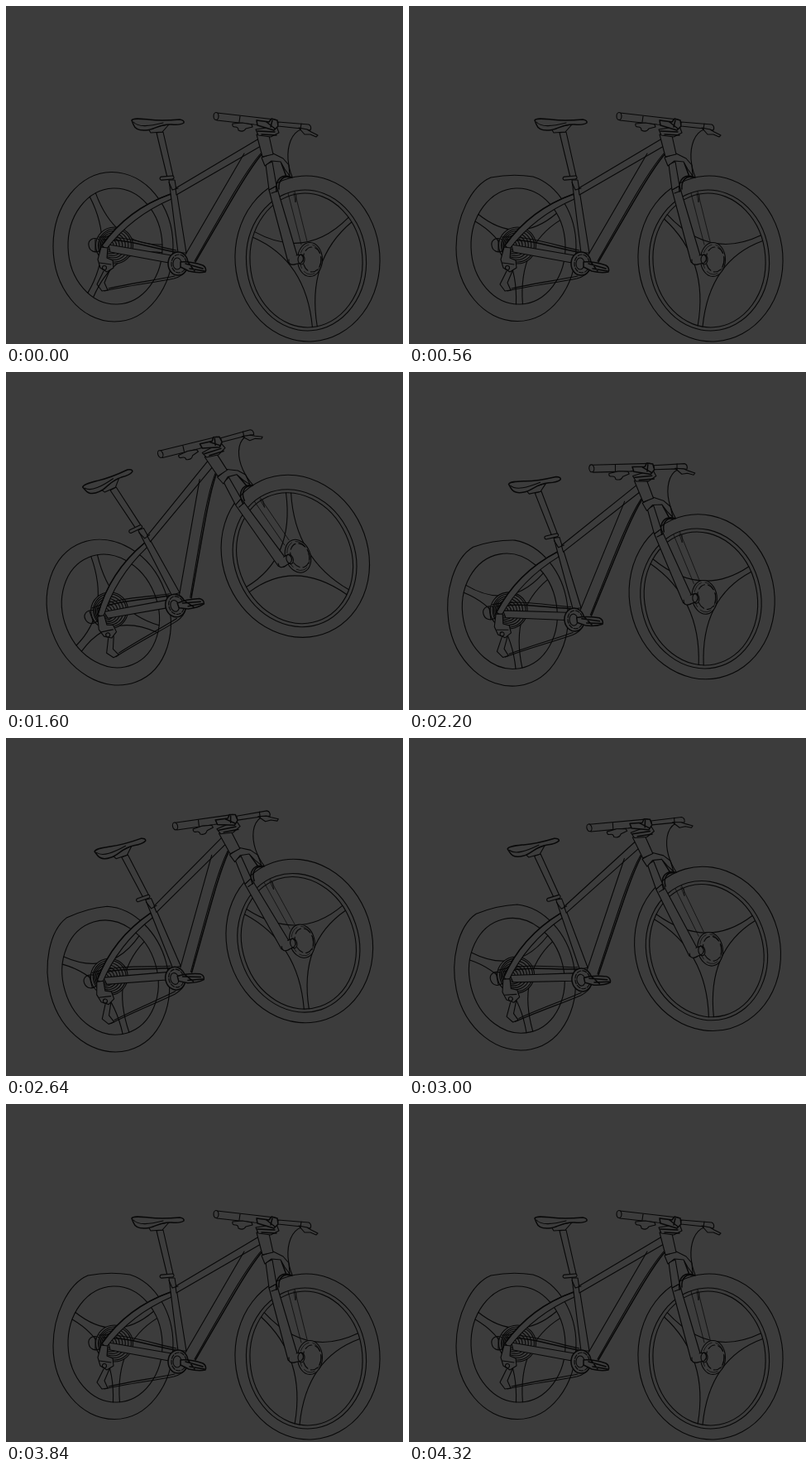
An HTML page for the animation above (4360 ms loop, 480 by 408 pixels).

```html
<!DOCTYPE html>
<html lang="en">
<head>
<meta charset="utf-8">
<title>Bicycle</title>
<style>
  html, body { margin: 0; width: 100%; height: 100%; overflow: hidden; background: #3c3c3c; }
  svg { display: block; width: 480px; height: 408px; }
  svg * { vector-effect: non-scaling-stroke; }
  #bike { fill: none; stroke: #080808; stroke-width: 1.1; stroke-linecap: round; stroke-linejoin: round; }
  .solid { fill: #3c3c3c; }
  .bold { stroke-width: 1.5; }
  .thin { stroke-width: .7; }
</style>
</head>
<body>
<svg viewBox="0 0 480 408">
  <g id="bike">
    <!-- rear wheel -->
    <path id="tyre"/>
    <g transform="translate(132 290) rotate(-2) scale(57 70)">
      <circle r="1"/>
      <path id="rearSpokes"/>
    </g>

    <!-- front wheel and lower fork, sliding on the suspension -->
    <g id="front">
      <g transform="translate(364.5 305) rotate(-4)"><ellipse rx="87.5" ry="100"/></g>
      <g transform="translate(363 307) rotate(-4)"><ellipse rx="72.5" ry="85"/></g>
      <g transform="translate(363 307) rotate(-4) scale(68 81)">
        <circle r="1"/>
        <path id="frontSpokes"/>
      </g>
      <path class="thin" d="M341 226L357 288M349 224L364 284M348 226L350 237L351 228"/>
      <ellipse class="solid" cx="367.500" cy="306" rx="15" ry="20.500"/>
      <ellipse cx="370" cy="306" rx="11" ry="15" stroke-dasharray="9 4"/>
      <ellipse cx="368" cy="306" rx="13" ry="18" class="thin" stroke-dasharray="14 5"/>
      <path class="solid" d="M318 222L341 309Q347 315 353 310L352 301L327 217Z"/>
      <path d="M321 226L329 223"/>
      <path class="solid" d="M342 306Q341 313 348 312L357 310Q362 305 357 300L351 301"/>
      <ellipse cx="357" cy="306" rx="4" ry="6"/>
      <path class="bold" d="M327 224C325 209 334 201 346 207M330 221C329 211 335 204 343 207M333 190L339 206"/>
    </g>

    <!-- cassette -->
    <ellipse class="solid" cx="131" cy="289" rx="22.500" ry="22"/>
    <g id="cassette"></g>
    <path d="M113 282C105 278 99 283 100 289C101 296 108 299 114 295M108 281V296"/>

    <!-- chain and stays -->
    <path class="bold" d="M118 282C145 281 180 293 210 298"/>
    <path d="M112 279C145 277 180 290 206 295"/>
    <path class="solid" d="M124 288L200 301L197 310L126 297Z"/>
    <path d="M119 344C145 338 178 334 203 329Q214 326 218 319M124 341C150 335 180 331 204 326"/>
    <path class="solid" d="M199 227C168 238 138 258 116 289L121 294C143 265 170 246 200 233Z"/>
    <path class="bold" d="M199 227C168 238 138 258 116 289"/>

    <!-- derailleur -->
    <path class="solid" d="M115 291L111 306L114 316L122 321L130 316L129 307L122 304L123 292Z"/>
    <circle cx="119" cy="316" r="2.500"/>
    <path d="M118 320L110 336L116 344L123 343L119 334L125 320M113 310L127 312"/>

    <!-- frame -->
    <path class="solid" d="M197 210L208 298L218 298L204 210Z"/>
    <path class="solid" d="M205 220L306 160L310 168L206 228Z"/>
    <path d="M288 178L217 300M308 178C290 199 272 231 228 308"/>
    <path class="bold" d="M309 179C291 201 273 234 229 309"/>
    <path d="M197 213L201 222L208 220"/>

    <!-- seat -->
    <path class="solid" d="M182 153L195 207L202 205L190 152Z"/>
    <rect class="solid" x="186" y="205.500" width="17" height="4" rx="2" transform="rotate(-5 195 207)"/>
    <path class="solid" d="M171 147L175 153L189 152L197 143Z"/>
    <path class="solid bold" d="M152 138C154 135 162 136 172 137C187 139 199 138 210 137Q216 138 215 141Q211 144 200 143C185 142 179 150 169 150Q157 151 154 143Z"/>
    <path d="M154 140C160 147 174 145 190 141"/>

    <!-- crank and pedal -->
    <ellipse class="solid bold" cx="208" cy="311" rx="12" ry="14"/>
    <ellipse cx="209" cy="311" rx="9" ry="11" stroke-dasharray="5 2"/>
    <ellipse cx="207" cy="311" rx="5" ry="7"/>
    <path class="solid bold" d="M211 309Q222 308 238 313Q243 316 241 321Q233 323 221 320L211 315Z"/>
    <path class="bold" d="M217 311L238 317M222 317L240 320M220 309L228 320"/>

    <!-- upper fork and head tube -->
    <path id="stanchion" class="solid"/>
    <path class="solid" d="M309 183L313 193L321 187L332 188L337 197L343 205L342 192L335 184L323 178Z"/>
    <path class="solid" d="M303 155L310 182L323 179L317 152Z"/>

    <!-- cockpit -->
    <path id="hose"/>
    <g transform="translate(0 1)">
      <path class="solid" d="M302 148L305 155L320 157L330 152L327 144Z"/>
      <path class="bold" d="M304 150L325 151M309 154L327 155"/>
      <path class="solid" d="M255 128L325 136L326 144L300 142L255 137Z"/>
      <ellipse class="solid" cx="254" cy="132" rx="3" ry="4.500"/>
      <path d="M283 132L282 139"/>
      <path class="solid" d="M274 141Q273 145 277 145Q281 145 281 149Q287 152 290 147L298 145L297 142L286 140Z"/>
      <path class="solid bold" d="M303 137L318 139L321 135L328 137L329 144L324 149L304 143Z"/>
      <path class="bold" d="M315 139L325 147M322 137L320 145"/>
      <path class="solid" d="M329 139L366 142Q370 144 368 149L357 147L329 144Z"/>
      <path class="solid" d="M354 146L361 154L368 154L375 157L377 155L369 151L364 148Z"/>
      <path d="M357 141L356 148"/>
    </g>
  </g>
</svg>
<script>
const FRAME = 40, COUNT = 109;
const $ = id => document.getElementById(id);

// time, crank x, crank y, pitch in degrees, fork compression
const poses = [
  [0, 208, 311, 0, 0], [560, 208, 311, 0, 0], [820, 203, 304.5, 5.4, 16],
  [1000, 204, 306, 4.6, 15], [1120, 206, 308, 1, 4], [1600, 205, 282, -20.2, 0],
  [1680, 204, 283.5, -18.5, 0], [2200, 200, 299, -8, 0], [2800, 207, 288.4, -16, 0],
  [3000, 209, 292, -11.7, 0], [3360, 210, 293, -11.7, 0], [3480, 208, 304, -5.3, 0],
  [3640, 208, 311, 0, 0], [4360, 208, 311, 0, 0]
];
const frontPhase = [-34, 52, -16], rearPhase = [4, 37, -29];
const roundTyre = 'M57 290C57 241 89 200 128 200.5C169 201 202 241 202 290C202 340 171 381 131 381C90 381 57 340 57 290Z';
const flatTyre = 'M57 292C57 255 75 217 99 207Q125 202 150 206C181 216 202 252 202 290C202 340 171 380.5 131 380.5C90 380.5 57 340 57 292Z';

const slope = (i, c) => (poses[i + 1][c] - poses[i][c]) / (poses[i + 1][0] - poses[i][0]);

function tangent(i, c) {
  if (i === 0 || i === poses.length - 1) return 0;
  const a = slope(i - 1, c), b = slope(i, c);
  return a * b > 0 ? 2 * a * b / (a + b) : 0;
}

// monotone cubic between neighbouring poses
function pose(t, c) {
  const i = poses.findIndex((p, k) => t < poses[k + 1][0]);
  const [p, q] = [poses[i], poses[i + 1]];
  const h = q[0] - p[0], u = (t - p[0]) / h, s = u * u * (3 - 2 * u);
  return p[c] + (q[c] - p[c]) * s
    + h * u * (1 - u) * ((1 - u) * tangent(i, c) - u * tangent(i + 1, c));
}

function spokes(gap) {
  const at = deg => `${Math.cos(deg * Math.PI / 180)} ${Math.sin(deg * Math.PI / 180)}`;
  return [0, 120, 240].map(a => `M${at(a + gap)}Q0 0 ${at(a + 120 - gap)}`).join('');
}

$('frontSpokes').setAttribute('d', spokes(2.5));
$('rearSpokes').setAttribute('d', spokes(4));
$('cassette').innerHTML = [20, 17.5, 15, 12.5, 10, 7.5, 5].map(r =>
  `<ellipse cx="${123 + r * .42}" cy="289" rx="${r}" ry="${r}"/>`).join('');

function draw(now) {
  const n = Math.floor(now / FRAME) % COUNT, t = n * FRAME;
  const k = (n + (n > 47) + (n > 65)) % 3; // wheel drawing, skipping a step twice
  $('frontSpokes').setAttribute('transform', `rotate(${frontPhase[k]})`);
  $('rearSpokes').setAttribute('transform', `rotate(${rearPhase[k]})`);
  $('tyre').setAttribute('d', k === 2 ? flatTyre : roundTyre);

  const squeeze = pose(t, 4), dx = -.25 * squeeze, dy = -.97 * squeeze;
  $('front').setAttribute('transform', `translate(${dx} ${dy})`);
  $('stanchion').setAttribute('d',
    `M314 191L${318 + dx} ${222 + dy}L${327 + dx} ${217 + dy}L322 188Z`);
  $('hose').setAttribute('d',
    `M357 149C345 153 340 169 341 ${185 + dy / 2}Q342 ${197 + dy} ${346 + dx} ${206 + dy}`);
  $('bike').setAttribute('transform',
    `translate(${pose(t, 1)} ${pose(t, 2)}) rotate(${pose(t, 3)}) translate(-208 -311)`);
}

let start;
function tick(now) {
  start ??= now;
  draw(now - start);
  requestAnimationFrame(tick);
}
draw(0);
requestAnimationFrame(tick);
</script>
</body>
</html>
```
